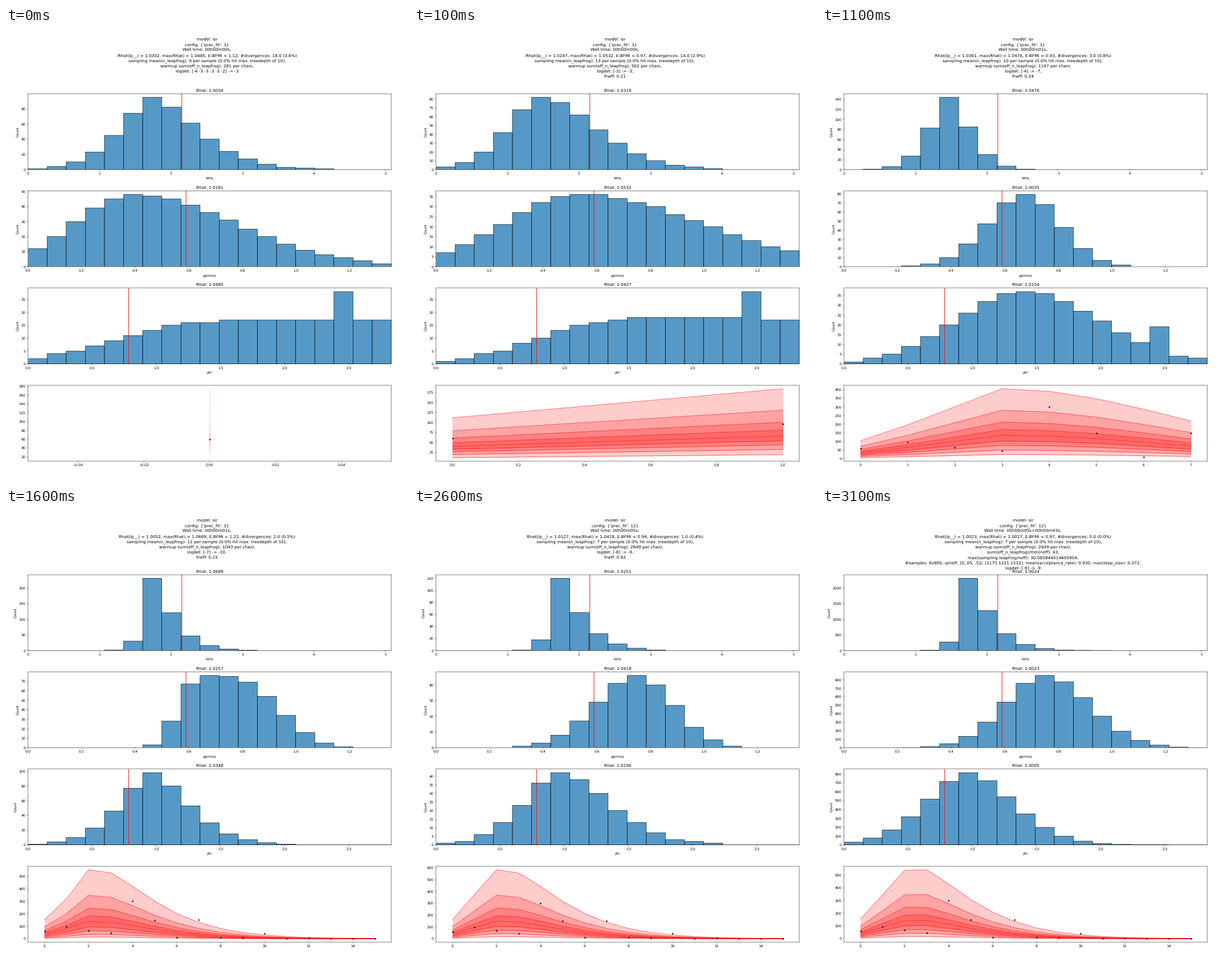
Write a matplotlib script that moves like this. It is 706 by 794 pixels and loops after 3600 ms.

```python
import numpy as np
import matplotlib.pyplot as plt
from matplotlib.animation import FuncAnimation

plt.rcParams.update({"font.family": "DejaVu Sans", "text.hinting": "none",
                     "path.snap": False})

W, H = 706, 794
STEP = 100
BINS = 19
BLUE = (31 / 255, 119 / 255, 180 / 255, 0.75)
# name, upper limit of the axis, true value
PARAMS = [("beta", 5.0816, 2.152), ("gamma", 1.3555, 0.5895), ("phi", 2.83, 0.784)]
OBSERVED = [60, 96, 66, 45, 302, 148, 10, 150, 8, 7, 42, 1, 4, 1, 1, 0]
# inner quantiles between the median and the extremes, on a log scale
UPPER = [1, 0.665, 0.41, 0.2]
LOWER = [1, 0.58, 0.33, 0.16]


def bell(peak, mode, left, right, power=2):
    """Lopsided bell of counts over the bins."""
    d = np.arange(BINS) - mode
    side = np.where(d < 0, left, right)
    return np.round(peak * np.exp(-(np.abs(d) / side) ** power))


def spike(height, at):
    return bell(height, at, 0.4, 0.4)


def epidemic(rise, n, width=3.1, power=1.3):
    """Median of n days: a few rising values, then a smooth decay."""
    d = np.arange(1, max(n - len(rise), 0) + 1)
    return np.append(rise, rise[-1] * np.exp(-(d / width) ** power))


def header(wall, prec, rhat, worst, bfmi, div, leap, warm, *rest):
    return [
        "model: sir",
        f"config: {{'prec_fit': {prec}}}",
        f"Wall time: {wall},",
        f"Rhat(lp__) = {rhat}, max(Rhat) = {worst}, E-BFMI = {bfmi}, #divergences: {div}",
        f"sampling mean(n_leapfrog): {leap} per sample (0.0% hit max. treedepth of 10),",
        f"warmup sum(eff_n_leapfrog): {warm} per chain,",
        *rest,
    ]


# each scene: header, Rhat values, histograms,
# (median, top / median, median / bottom) of the fan
SCENES = [
    (header("00h00m00s", 3, "1.0302", "1.0485", "1.12", "18.0 (3.6%)", 9, 281,
            "logdet: [-4 -3 -3 -3 -3 -2] -> -3"),
     ("1.0056", "1.0181", "1.0485"),
     (bell(95, 6, 2.4, 3.3, 1.6),
      bell(48, 5, 4.3, 7.5),
      bell(17, 12, 9.5, 20, 3) + spike(11, 16)),
     (epidemic([57], 1), 3.06, 3.15)),
    (header("00h00m00s", 3, "1.0247", "1.0532", "0.97", "14.0 (2.9%)", 13, 562,
            "logdet: [-3] -> -3,", "fneff: 0.21"),
     ("1.0318", "1.0532", "1.0427"),
     (bell(82, 5, 2.5, 4, 1.8),
      bell(36, 7, 5.5, 9),
      bell(18, 12, 8.5, 15, 3) + spike(10, 16)),
     (epidemic([40, 66], 2), 2.8, 3.4)),
    (header("00h00m00s", 3, "1.0214", "1.0761", "0.85", "15.0 (3.2%)", 16, 829,
            "logdet: [-3] -> -4,", "fneff: 0.17"),
     ("1.0634", "1.0601", "1.0761"),
     (bell(70, 5, 2.9, 4.5),
      bell(24, 12, 9, 7, 3) + spike(17, 10),
      bell(19, 12, 7.5, 12, 3) + spike(10, 16)),
     (epidemic([36, 66, 87, 96], 4), 2.59, 3.4)),
    (header("00h00m01s", 3, "1.0361", "1.0476", "0.93", "3.0 (0.8%)", 10, 1197,
            "logdet: [-4] -> -7,", "fneff: 0.24"),
     ("1.0476", "1.0035", "1.0104"),
     (bell(144, 5, 1.45, 1.5, 1.6),
      bell(79, 9, 2.8, 2.55),
      bell(37, 9, 5, 5.5) + spike(12, 16)),
     (epidemic([35, 66, 101, 136], 8, 5.1, 2), 2.985, 5.5)),
    (header("00h00m01s", 3, "1.0052", "1.0689", "1.22", "2.0 (0.5%)", 12, 1043,
            "logdet: [-7] -> -10,", "fneff: 0.15"),
     ("1.0689", "1.0257", "1.0348"),
     (bell(231, 6, 0.58, 1.4, 1.3),
      bell(76, 9, 2, 4.3, 3),
      bell(98, 6, 2.4, 2.7, 1.6)),
     (epidemic([38, 80, 138, 132], 16), 4, 10.5)),
    (header("00h00m02s", 6, "1.0559", "1.1260", "0.86", "11.0 (4.4%)", 7, 1948,
            "logdet: [-10] -> -8,", "fneff: 1.00"),
     ("1.0907", "1.1260", "1.0810"),
     (bell(117, 6, 0.55, 1.55, 1.1),
      bell(50, 10, 3.3, 2.4),
      bell(39, 5, 2.6, 4.2)),
     (epidemic([41, 99, 165, 139], 16), 4.17, 9)),
    (header("00h00m05s", 12, "1.0127", "1.0418", "0.94", "1.0 (0.4%)", 7, 2649,
            "logdet: [-8] -> -9,", "fneff: 0.92"),
     ("1.0251", "1.0418", "1.0196"),
     (bell(120, 6, 0.58, 1.45, 1.2),
      bell(46, 10, 3, 2.7),
      bell(42, 6, 2.7, 3.6, 1.8)),
     (epidemic([41, 95, 148, 141], 16), 3.95, 8.5)),
    (header("00h00m05s+00h00m43s", 12, "1.0023", "1.0027", "0.97", "0.0 (0.0%)", 7, 2649,
            "sum(eff_n_leapfrog)/min(neff): 43,",
            "max(sampling leapfrog/neff): 30.085844014605954,",
            "#samples: 6x800, q(neff, [0,.05, .5]): [1175 1221 1512], "
            "mean(acceptance_rate): 0.930, max(step_size): 0.372,",
            "logdet: [-9] -> -9"),
     ("1.0024", "1.0023", "1.0005"),
     (bell(2311, 6, 0.56, 1.5, 1.3),
      bell(850, 10, 2.95, 3.3),
      bell(815, 6, 3.1, 3.3, 1.8)),
     (epidemic([41, 91, 142, 143], 16), 3.79, 8.2)),
]

fig = plt.figure(figsize=(16, 17.995), dpi=44.125)
axes = [fig.add_axes([38.6 / W, 1 - (248.2 + 170.3 * i) / H, 638 / W, 133 / H])
        for i in range(4)]
heading = [fig.text(0.5, 1 - (22 + 9.3 * i) / H, "", ha="center", fontsize=12)
           for i in range(10)]


def draw_hist(ax, counts, rhat, name, limit, truth):
    width = limit / BINS
    ax.bar(np.arange(BINS) * width, counts, width, align="edge",
           facecolor=BLUE, edgecolor="black", linewidth=1)
    ax.axvline(truth, color="red")
    ax.set(xlim=(0, limit), ylim=(0, counts.max() * 1.05),
           xlabel=name, ylabel="Count", title=f"Rhat: {rhat}")


def draw_fan(ax, median, up, down):
    x = np.arange(len(median))
    for hi, lo in zip(UPPER, LOWER):
        high, low = median * up ** hi, median / down ** lo
        ax.fill_between(x, low, high, color="red", alpha=0.2)
        ax.plot(x, high, x, low, color="red", alpha=0.5)
    ax.plot(x, median, color="red", alpha=0.5)
    ax.plot(x, OBSERVED[:len(x)], "k.")


def update(frame):
    # the first scene is short, the others last 500 ms
    lines, rhats, hists, fan = SCENES[(frame * STEP + 400) // 500]
    for i, text in enumerate(heading):
        text.set_text(lines[i] if i < len(lines) else "")
    for ax in axes:
        ax.clear()
    for ax, counts, rhat, param in zip(axes, hists, rhats, PARAMS):
        draw_hist(ax, counts, rhat, *param)
    draw_fan(axes[3], *fan)
    return axes


anim = FuncAnimation(fig, update, frames=36, interval=STEP, repeat=True, repeat_delay=0)
plt.show()
```
